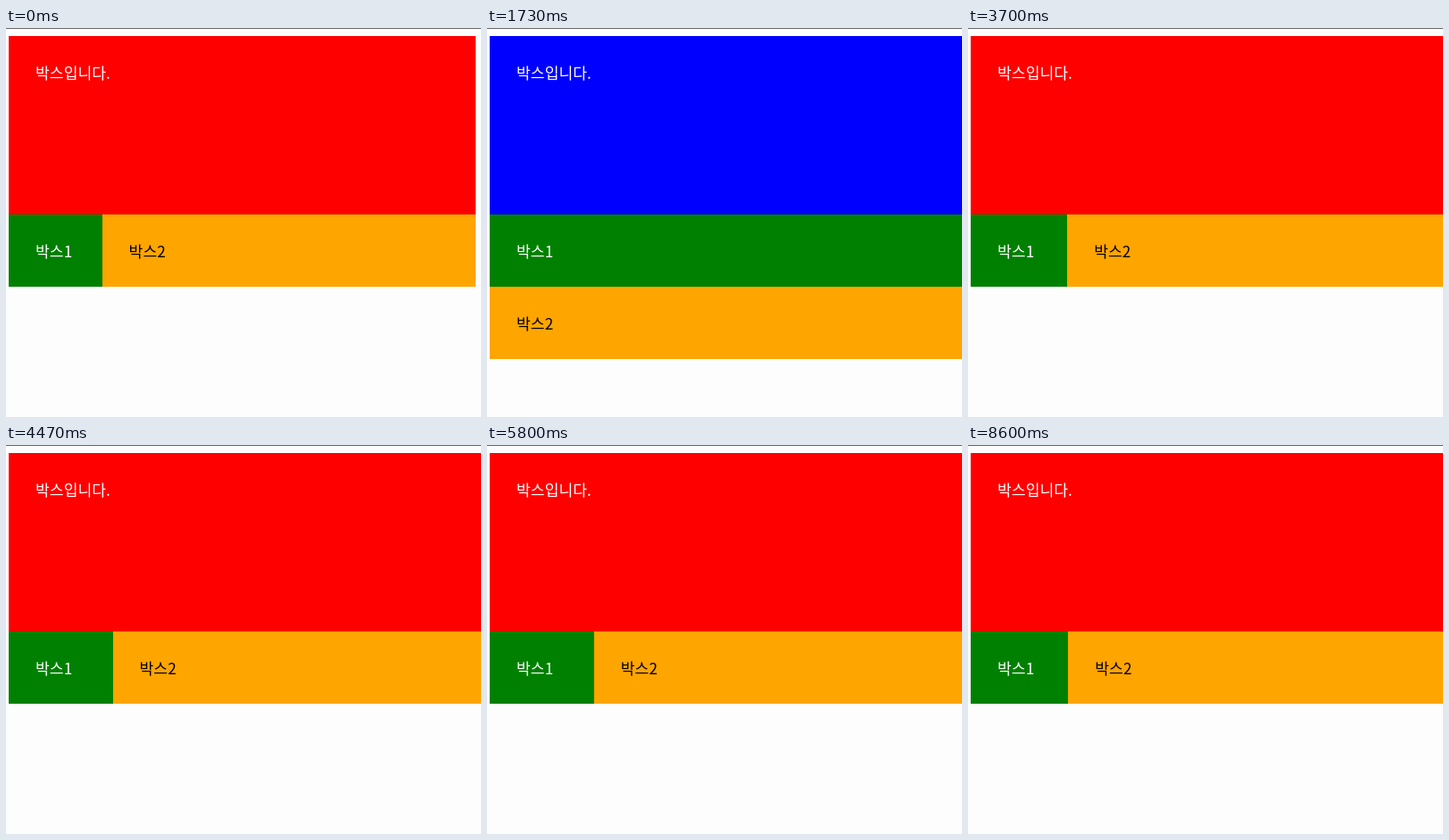
An HTML page that plays this animation: 532x436 px, repeating every 8630 ms.

```html
<!DOCTYPE html>
<html lang="ko">
<head>
<meta charset="utf-8">
<title>Responsive boxes</title>
<style>
  html, body {
    margin: 0;
    width: 100%;
    height: 100%;
    overflow: hidden;
    background: #fdfdfd;
  }
  .stage {
    position: relative;
    width: 532px;
    height: 436px;
    overflow: hidden;
    font: 300 17.2px/21px "Noto Sans CJK KR", "Noto Sans CJK", "Noto Sans CJK JP", sans-serif;
  }
  .edge {
    position: absolute;
    inset: 0 0 auto;
    height: 1px;
    background: #666;
  }
  /* A simulated browser window whose width is dragged back and forth */
  .view {
    position: absolute;
    left: -5px;
    top: 1px;
    height: 435px;
    container-type: inline-size;
    animation: drag 8630ms linear infinite;
  }
  .page { margin: 8px; }
  .page div {
    box-sizing: border-box;
    white-space: nowrap;
  }
  .row { display: flex; }
  .top, .one, .two { padding: 30px; }
  .top, .one { color: #fff; }
  .top {
    height: 200px;
    background: #fe0000;
  }
  .one {
    width: 20%;
    background: #008000;
  }
  .two {
    width: 80%;
    background: #ffa500;
    color: #000;
  }
  @container (min-width: 601px) {
    .top { background: #0000fe; }
    .row { display: block; }
    .one, .two { width: 100%; }
  }
  @keyframes drag {
    0%, 10.2% { width: 539px; }
    15.87% { width: 598px; }
    18.5%  { width: 630px; }
    27%    { width: 690px; }
    34%    { width: 680px; }
    39.4%  { width: 601px; }
    42.87% { width: 557px; }
    45.8%  { width: 553px; }
    48.7%  { width: 562px; }
    52%    { width: 601px; }
    57%    { width: 670px; }
    62%    { width: 670px; }
    67%    { width: 601px; }
    67.2%  { width: 600px; }
    72.2%  { width: 564px; }
    75%, 100% { width: 562.5px; }
  }
</style>
</head>
<body>
  <div class="stage">
    <div class="edge"></div>
    <div class="view">
      <div class="page">
        <div class="top">박스입니다.</div>
        <div class="row">
          <div class="one">박스1</div>
          <div class="two">박스2</div>
        </div>
      </div>
    </div>
  </div>
</body>
</html>
```
